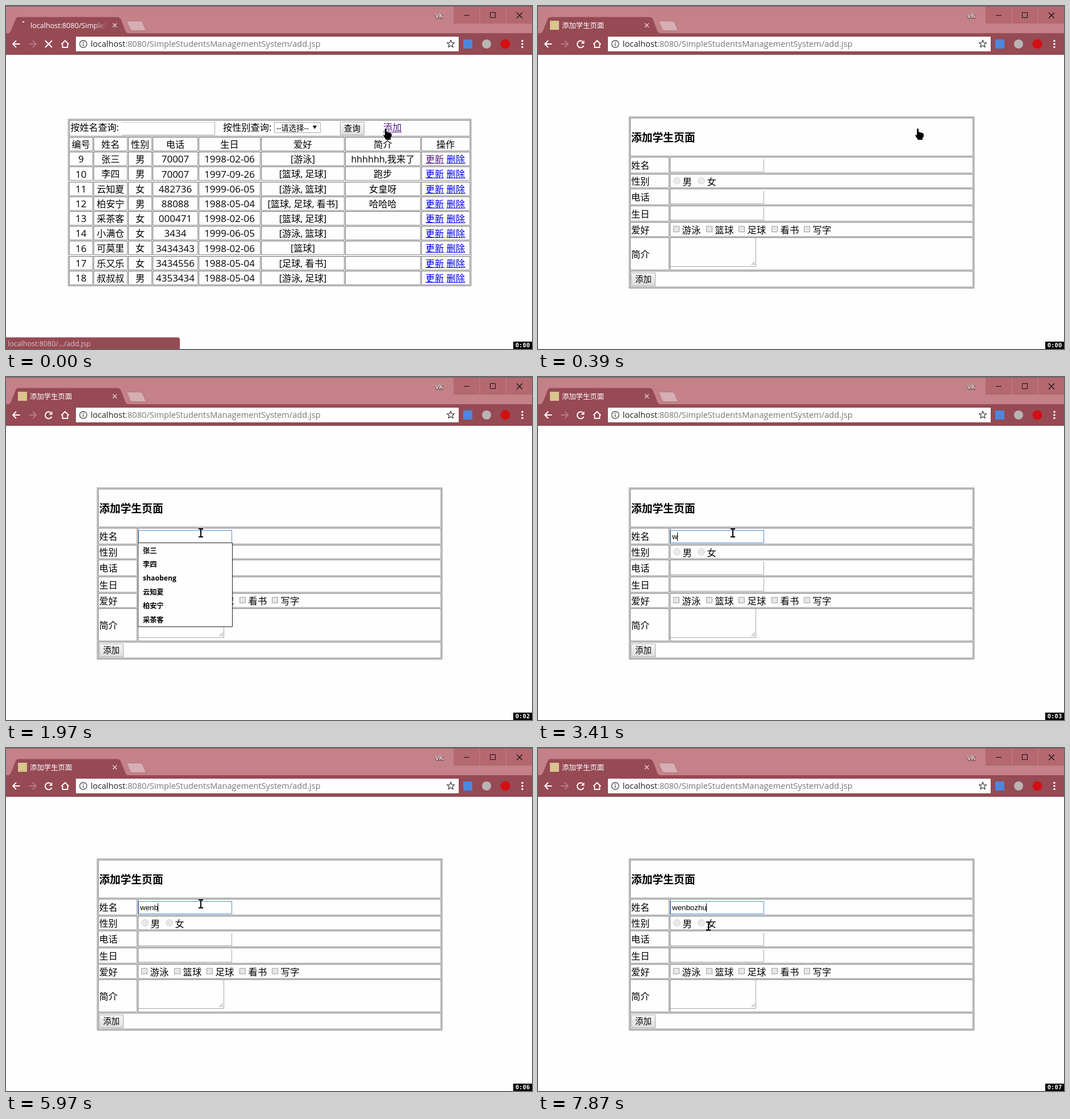
Write an HTML page with a canvas that moves like this. It is 926 by 605 pixels and loops after 7.99 s.

```html
<!DOCTYPE html>
<html lang="zh">
<head>
<meta charset="utf-8">
<style>
html, body { margin: 0; width: 100%; height: 100%; overflow: hidden; background: #fefefe; }
canvas { display: block; }
</style>
</head>
<body>
<canvas id="stage" width="926" height="605"></canvas>
<script>
const ctx = document.getElementById('stage').getContext('2d');
const LOOP = 7990, PAGE_READY = 120, FOCUS = 1330, BLINK = 520, SECOND = 990;
const UI = '"Open Sans", "Noto Sans CJK SC", "Noto Sans CJK", sans-serif';
const ARIAL = '"Liberation Sans", sans-serif';
const MONO = '"DejaVu Sans Mono", monospace';
const PAPER = '#fefefe', BAR = '#964a54', LINK = '#0000ee', VISITED = '#551a8b';
const LIGHT = '#8a8a8a', DARK = '#666', FIELD = '#a9a9a9';

const students = `9|张三|男|70007|1998-02-06|[游泳]|hhhhhh,我来了
10|李四|男|70007|1997-09-26|[篮球, 足球]|跑步
11|云知夏|女|482736|1999-06-05|[游泳, 篮球]|女皇呀
12|柏安宁|男|88088|1988-05-04|[篮球, 足球, 看书]|哈哈哈
13|采茶客|女|000471|1998-02-06|[篮球, 足球]
14|小满仓|女|3434|1999-06-05|[游泳, 篮球]
16|可莫里|女|3434343|1998-02-06|[篮球]
17|乐又乐|女|3434556|1988-05-04|[足球, 看书]
18|叔叔叔|男|4353434|1988-05-04|[游泳, 足球]`.split('\n').map(row => row.split('|'));
const headings = ['编号', '姓名', '性别', '电话', '生日', '爱好', '简介', '操作'];
const columnWidths = [42, 60, 42, 80, 109, 147, 133, 86];
const formLabels = ['添加学生页面', '姓名', '性别', '电话', '生日', '爱好', '简介', ''];
const formHeights = [68, 29, 25, 29, 28, 26, 58, 29];
const suggestions = ['张三', '李四', 'shaobeng', '云知夏', '柏安宁', '采茶客'];

// One key press per character; '<' is backspace
const strokes = 'wen<<enbozhu';
const strokeTimes = [3410, 3660, 4220, 4650, 4780, 5080, 5330, 5570, 6090, 6230, 6360, 6670];

const ease = (t, from, to) => {
  const p = Math.min(1, Math.max(0, (t - from) / (to - from)));
  return p * p * (3 - 2 * p);
};
// Turns sizes into [start, end] pairs separated by one pixel
const spans = (start, sizes) => sizes.map(size => {
  const span = [start, start + size];
  start += size + 1;
  return span;
});

function rect(x, y, w, h, color) {
  ctx.fillStyle = color;
  ctx.fillRect(x, y, w, h);
}
function outline(x, y, w, h, color) {
  ctx.lineWidth = 1;
  ctx.strokeStyle = color;
  ctx.strokeRect(x + .5, y + .5, w - 1, h - 1);
}
function text(str, x, middle, size, { color = '#000', align = 'left', weight = 400, font = UI } = {}) {
  ctx.font = `${weight} ${size}px ${font}`;
  ctx.textAlign = align;
  ctx.fillStyle = color;
  ctx.fillText(str, x, middle + size * .37);
}
function path(d, fill, stroke, width = 1) {
  const shape = new Path2D(d);
  ctx.lineWidth = width;
  if (stroke) { ctx.strokeStyle = stroke; ctx.stroke(shape); }
  if (fill) { ctx.fillStyle = fill; ctx.fill(shape); }
}
function circle(x, y, r, fill, stroke, width) {
  path(`M${x - r} ${y}a${r} ${r} 0 1 0 ${2 * r} 0a${r} ${r} 0 1 0 ${-2 * r} 0`, fill, stroke, width);
}
function cross(x, y, r, color, width) {
  path(`M${x - r} ${y - r}l${2 * r} ${2 * r}m0 ${-2 * r}l${-2 * r} ${2 * r}`, null, color, width);
}

// One-pixel bevel; right and bottom are exclusive
function bevel(left, top, right, bottom, topLeft, bottomRight) {
  outline(left, top, right - left, bottom - top, bottomRight);
  rect(left, top, right - left, 1, topLeft);
  rect(left, top, 1, bottom - top, topLeft);
}
const cell = (...box) => bevel(...box, DARK, LIGHT);
const frame = (...box) => bevel(...box, LIGHT, DARK);

function field(x, y, w, h) {
  rect(x, y + h - 1, w, 1, FIELD);
  rect(x + w - 1, y, 1, h, FIELD);
}
function button(label, x, y) {
  const shade = ctx.createLinearGradient(0, y, 0, y + 24);
  shade.addColorStop(0, '#f6f6f6');
  shade.addColorStop(1, '#dcdcdc');
  rect(x, y, 43, 24, shade);
  outline(x, y, 43, 24, FIELD);
  text(label, x + 21.5, y + 12, 14.4, { align: 'center' });
}
function link(label, x, middle, color) {
  text(label, x, middle, 16.2, { color });
  rect(x, Math.round(middle + 7), 33, 1, color);
}

function drawTab(loading) {
  path('M5 48Q9 45 11 38L17 23Q18 19.5 22 19.5H196Q200 19.5 202 23L208 38Q210 46 214 48Z', BAR);
  path('M213 27H236Q239 27 240 29L246 43H223Q220 43 219 41Z', '#d5afb3', '#a9656d');
  cross(191.5, 34, 3.5, '#ead5d7', 1.3);
  if (loading) {
    const fade = ctx.createLinearGradient(155, 0, 178, 0);
    fade.addColorStop(0, '#fff');
    fade.addColorStop(1, BAR);
    rect(29, 27, 3, 2, '#fff');
    text('localhost:8080/SimpleS', 43, 34, 12.6, { color: fade });
  } else {
    rect(21, 26, 16, 16, '#d8c48c');
    text('添加学生页面', 42, 34, 12.4, { color: '#fff' });
  }
}

function drawToolbar(loading) {
  rect(0, 48, 926, 38, BAR);
  rect(0, 85, 926, 1, '#7e3d46');
  path('M24.5 67H12M18 61L12 67L18 73', null, '#fff', 1.9);
  path('M40.5 67H53M47 61L53 67L47 73', null, '#b57c83', 1.9);
  if (loading) {
    cross(75, 67, 6, '#fff', 2);
  } else {
    path('M80.5 70A6 6 0 1 1 78.5 62.5', null, '#fff', 2);
    path('M81.5 60.5v6h-6z', '#fff');
  }
  path('M97.5 67.5L104 61L110.5 67.5M99.5 67V73H108.5V67', null, '#fff', 1.8);

  rect(122, 53, 676, 28, '#8a424b');
  rect(123, 54, 674, 26, PAPER);
  circle(136, 67, 6.3, null, '#555', 1.4);
  path('M136 63v1.7m0 1.3v4.5', null, '#555', 1.5);
  const host = 'localhost';
  text(host, 149, 67, 14.6, { color: '#222' });
  text(':8080/SimpleStudentsManagementSystem/add.jsp', 149 + ctx.measureText(host).width, 67, 14.6, { color: '#777' });
  const star = Array.from({ length: 10 }, (_, i) => {
    const angle = i * Math.PI / 5, r = i % 2 ? 3 : 7;
    return [783 + r * Math.sin(angle), 67 - r * Math.cos(angle)];
  });
  path(`M${star.join('L')}Z`, null, '#444', 1.3);
  rect(805, 59, 16, 16, '#4c87de');
  circle(846, 67, 8, '#b9b4b5');
  circle(879, 67, 8.5, '#d40f14');
  for (let i = -1; i <= 1; i++) circle(909, 67 + i * 5.5, 1.8, '#fff');
}

function drawBrowser(loading) {
  rect(0, 0, 926, 48, '#c48187');
  rect(0, 0, 926, 1, '#66605a');
  for (let i = 0; i < 3; i++) rect(788 + i * 46.5, 1, 45.5, 30, '#b5686f');
  rect(806, 16, 10, 1, '#111');
  outline(852, 11, 10, 10, '#111');
  cross(904, 16.5, 5, '#111', 1.2);
  ctx.lineJoin = 'round';
  ctx.font = `13.5px ${UI}`;
  ctx.textAlign = 'left';
  ctx.lineWidth = 2;
  ctx.strokeStyle = '#7d5a5e';
  ctx.strokeText('vk', 755.5, 21.5);
  text('vk', 755.5, 16.5, 13.5, { color: '#fff' });
  drawTab(loading);
  drawToolbar(loading);
}

function drawList() {
  frame(109, 199, 819, 494);
  cell(111, 201, 817, 230);
  text('按姓名查询:', 113.5, 214.5, 16.2);
  rect(204, 205, 163, 1, '#d5d5d5');
  field(204, 205, 164, 23);
  text('按性别查询:', 382, 214.5, 16.2);
  outline(472, 205, 82, 19, FIELD);
  text('--请选择--', 476, 215, 13.3);
  path('M540 211h7l-3.5 6z', '#000');
  button('查询', 588, 204);
  link('添加', 664, 214.5, VISITED);
  const columns = spans(111, columnWidths);
  [headings, ...students].forEach((row, r) => {
    const top = Math.round(231 + r * 26.2), middle = 244 + r * 26.2;
    columns.forEach(([left, right], c) => {
      const value = row[c] || '';
      cell(left, top, right, top + 25);
      text(value, (left + right) / 2, middle, /^\d/.test(value) ? 17 : 16.2, { align: 'center' });
    });
    if (r) {
      link('更新', 738.5, middle, r === 1 ? VISITED : LINK);
      link('删除', 775.5, middle, LINK);
    }
  });
}

function drawForm() {
  frame(160, 195, 768, 498);
  spans(197, formHeights).forEach(([top, bottom], i) => {
    const label = formLabels[i], middle = (top + bottom) / 2;
    const wide = i === 0 || i === formLabels.length - 1;
    cell(162, top, wide ? 766 : 231, bottom);
    if (!wide) cell(232, top, 766, bottom);
    text(label, 164, middle + (wide ? 1.5 : .8), wide ? 18.8 : 16.2, { weight: wide ? 700 : 400 });
    if (['姓名', '电话', '生日'].includes(label)) field(233, Math.floor(middle - 10.5), 165, 23);
  });
  ['男', '女'].forEach((label, i) => {
    const x = 244.5 + i * 43;
    circle(x, 308.5, 5.5, '#e9e9e9', '#999');
    text(label, x + 10, 309.5, 16.4);
  });
  ['游泳', '篮球', '足球', '看书', '写字'].forEach((label, i) => {
    const x = Math.round(238 + i * 57.5);
    rect(x, 388, 11, 11, '#e6e6e6');
    outline(x, 388, 11, 11, '#a0a0a0');
    text(label, x + 15.5, 394.5, 16.4);
  });
  field(233, 409, 151, 51);
  path('M376 457l6 -6m-2 6l2 -2', null, '#777');
  button('添加', 164, 470);
}

function drawNameInput(t) {
  if (t < FOCUS) return;
  const pressed = strokeTimes.filter(time => time <= t);
  const typed = [...strokes.slice(0, pressed.length)]
    .reduce((word, key) => key === '<' ? word.slice(0, -1) : word + key, '');
  rect(233, 270, 165, 23, PAPER);
  outline(233, 270, 165, 23, '#4d90e6');
  text(typed, 236, 281, 13.333, { font: ARIAL });
  const sinceInput = t - (pressed.pop() || FOCUS);
  const caretOn = Math.floor(sinceInput / BLINK) % 2 === 0;
  if (caretOn) rect(Math.floor(235.7 + ctx.measureText(typed).width), 274, 1, 15, '#000');
  if (t >= 1480 && !typed) {
    rect(232, 292, 167, 149, PAPER);
    outline(232, 292, 167, 149, '#222');
    suggestions.forEach((name, i) => text(name, 241, 306 + i * 24.4, 12.2, { weight: 700 }));
  }
}

function drawCursor(t) {
  const reach = ease(t, 420, 1030), away = ease(t, 7560, 7870);
  ctx.save();
  ctx.translate(Math.round(671 - 328 * reach - 43 * away), Math.round(226 + 49 * reach + 39 * away));
  if (t < 540) {
    path('M-4 -9q1.5 -2 3 0v5l7 2q2 1 2 3v3l-2 3v3h-8l-4 -6l-1 -3l3 1z', '#000', '#fff', 1.5);
  } else if (reach < 1) {
    path('M0 0v16l4 -3.5l2.5 5.5l2.5 -1l-2.5 -5.5h5z', '#000', '#fff', 1.5);
  } else {
    path('M-4 -7h3l1 1l1 -1h3M0 -6V6M-4 7h3l1 -1l1 1h3', null, '#000', 2);
  }
  ctx.restore();
}

function drawStatus(t) {
  ctx.globalAlpha = 1 - ease(t, 200, 380);
  path('M0 584.5H302Q306 584.5 306 588.5V605H0Z', BAR);
  text('localhost:8080/.../add.jsp', 3, 595.5, 12.5, { color: '#dfc0c4' });
  ctx.globalAlpha = 1;
}

function draw(t) {
  const loading = t < PAGE_READY;
  rect(0, 0, 926, 605, PAPER);
  drawBrowser(loading);
  if (loading) {
    drawList();
  } else {
    drawForm();
    drawNameInput(t);
  }
  drawStatus(t);
  drawCursor(t);
  rect(893, 592, 33, 13, '#000');
  const clock = '0:0' + Math.floor((t + 20) / SECOND);
  text(clock, 909.5, 598.2, 10.6, { color: '#fff', align: 'center', weight: 700, font: MONO });
}

const begin = performance.now();
function tick() {
  draw((performance.now() - begin) % LOOP);
  requestAnimationFrame(tick);
}
tick();
</script>
</body>
</html>
```
